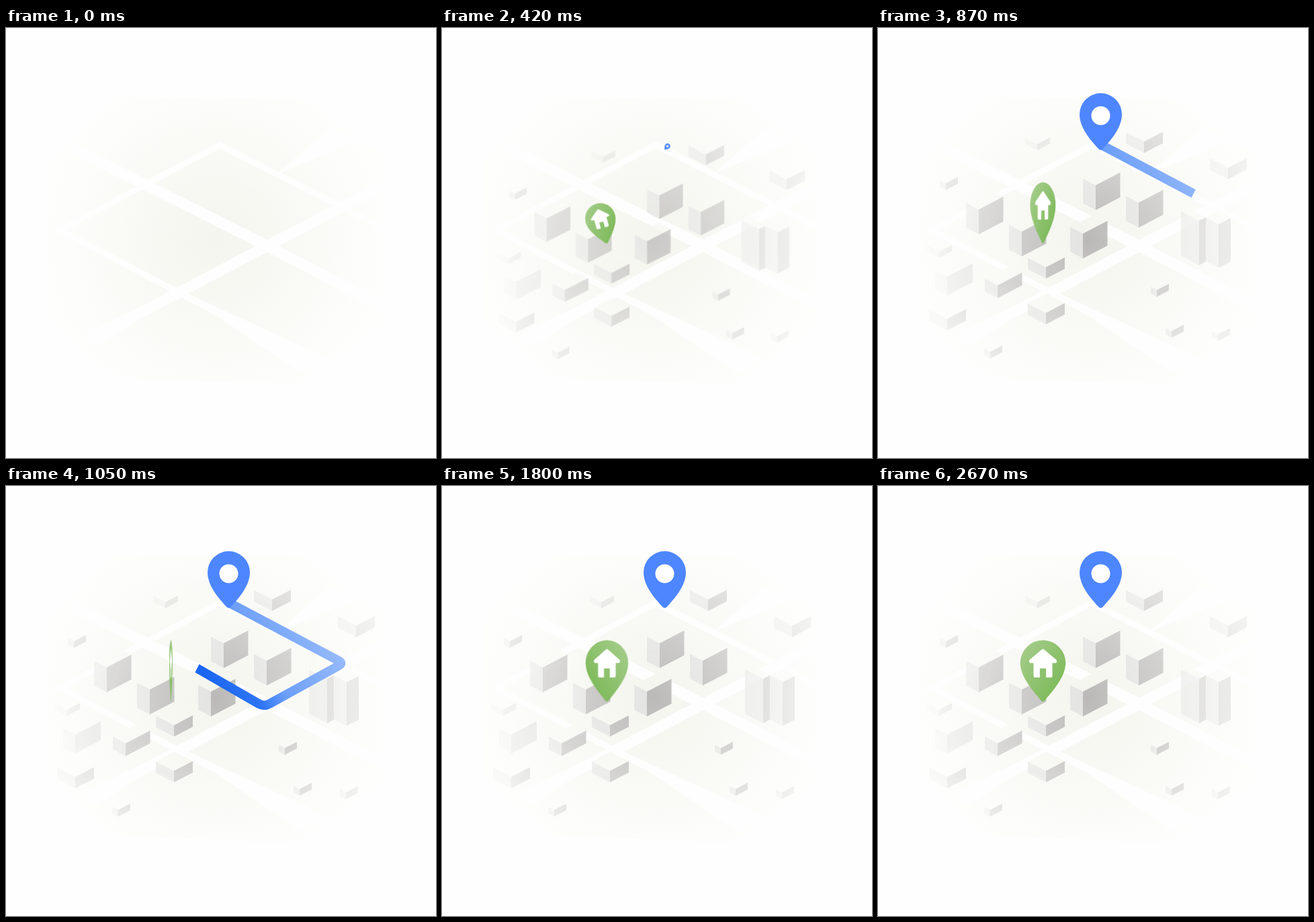
An HTML page for the animation above (2730 ms loop, 640 by 640 pixels).

```html
<!DOCTYPE html>
<html lang="en">
<head>
<meta charset="utf-8">
<title>Route on a map</title>
<style>
  html, body { margin: 0; width: 100%; height: 100%; overflow: hidden; background: #fefefe; }
  svg { position: absolute; inset: 0; width: 100%; height: 100%; }

  .city, .pop, .route, #home { animation: 2730ms linear infinite both; }

  .city { transform-origin: 308px 506px; animation-name: rise; }
  @keyframes rise {
    0%, 6.593% { transform: scale(.857, .78); opacity: 0; animation-timing-function: cubic-bezier(.333, 1, .667, 1); }
    30.769%, 100% { transform: none; opacity: 1; }
  }

  .pop { transform-origin: var(--x) var(--y); }
  .home { --x: 245.5px; --y: 320.5px; --tilt: -45deg; animation-name: pop-home; }
  .goal { --x: 331.5px; --y: 181px; --tilt: 45deg; animation-name: pop-goal; }
  @keyframes pop-home {
    0%, 6.593% { transform: rotate(var(--tilt)) scale(0); animation-timing-function: cubic-bezier(.333, 1, .667, 1); }
    35.165%, 100% { transform: rotate(0deg) scale(1); }
  }
  @keyframes pop-goal {
    0%, 14.725% { transform: rotate(var(--tilt)) scale(0); animation-timing-function: cubic-bezier(.333, 1, .667, 1); }
    30.549%, 100% { transform: rotate(0deg) scale(1); }
  }

  #home { transform-origin: 38.36% 50%; animation-name: spin; }
  @keyframes spin {
    0%, 25.275% { transform: rotateY(0deg); animation-timing-function: cubic-bezier(.25, .55, .6, .78); }
    63.736% { transform: rotateY(180deg); animation-timing-function: cubic-bezier(.25, .44, .6, .76); }
    97.802%, 100% { transform: rotateY(360deg); }
  }

  .route { fill: none; stroke: url(#blue); stroke-width: 13.6; stroke-dasharray: 1 2; animation-name: travel; }
  @keyframes travel {
    0%, 25.275% { stroke-dashoffset: 1; visibility: hidden; animation-timing-function: ease-in-out; }
    41.98% { stroke-dashoffset: 0; visibility: visible; }
    45.6% { stroke-dashoffset: 0; visibility: visible; animation-timing-function: ease-in-out; }
    63.736%, 100% { stroke-dashoffset: -1; visibility: hidden; }
  }
</style>
</head>
<body>
<svg viewBox="0 0 640 640">
  <defs>
    <radialGradient id="ground" gradientUnits="userSpaceOnUse" cx="312" cy="315" r="256">
      <stop offset="0" stop-color="#f5f5ef"/>
      <stop offset=".5" stop-color="#f9f9f5"/>
      <stop offset="1" stop-color="#fefefd"/>
    </radialGradient>
    <radialGradient id="fade" gradientUnits="userSpaceOnUse" cx="312" cy="315" r="330">
      <stop offset="0" stop-color="#fff"/>
      <stop offset=".45" stop-color="#fff" stop-opacity=".52"/>
      <stop offset=".76" stop-color="#fff" stop-opacity=".18"/>
      <stop offset="1" stop-color="#fff" stop-opacity="0"/>
    </radialGradient>
    <mask id="haze" maskUnits="userSpaceOnUse" x="0" y="0" width="640" height="640">
      <rect width="640" height="640" fill="url(#fade)"/>
    </mask>
    <linearGradient id="blue" gradientUnits="userSpaceOnUse" x1="505" y1="255" x2="300" y2="378">
      <stop offset="0" stop-color="#98bbfa"/>
      <stop offset=".44" stop-color="#6d9ff8"/>
      <stop offset=".6" stop-color="#2f76f4"/>
      <stop offset=".8" stop-color="#1b66f1"/>
    </linearGradient>
  </defs>

  <path fill="url(#ground)" d="M160 104H440L560 190V440L430 531L165 521L62 430V200Z"/>
  <g fill="none" stroke="#fefefe">
    <path stroke-width="16" d="M95 177 388 324 560 413M120 466 388 325 560 235"/>
    <path stroke-width="9" d="M560 297 318 174 80 301 460 500"/>
  </g>
  <path fill="#fefefe" d="M250 386 440 514 480 492ZM404 217 480 150 530 166ZM262 388 120 452 135 476Z"/>

  <g class="city" id="roofs" fill="url(#ground)"></g>
  <g mask="url(#haze)"><g class="city" id="walls"></g></g>

  <path class="route" pathLength="1" d="M331.5 173.5 495 260Q502 263.7 495 267.6L392 324.2Q384 328.6 376 324L285 271.7Q279 268.3 273 271.5L246 286"/>

  <g class="pop goal">
    <g transform="translate(331.5 181)">
      <path fill="#4d86ff" d="M0 .5C-2 .5-3-1-4-2-12-11-31.5-31-31.5-52.5A31.5 31.5 0 0 1 31.5-52.5C31.5-31 12-11 4-2 3-1 2 .5 0 .5Z"/>
      <circle cy="-50.5" r="14" fill="#fefefe"/>
    </g>
  </g>
</svg>

<svg id="home" viewBox="0 0 640 640">
  <defs>
    <linearGradient id="green" x1=".1" y1=".1" x2=".8" y2=".75">
      <stop offset="0" stop-color="#a3cc89"/>
      <stop offset="1" stop-color="#80bb5d"/>
    </linearGradient>
  </defs>
  <g class="pop home">
    <g transform="translate(245.5 320.5)">
      <path fill="url(#green)" d="M0 .2C-1.5 .2-2.5-1-3.5-2-12-13-33.75-35-33.75-57.2A33.75 33.75 0 0 1 33.75-57.2C33.75-35 12-13 3.5-2 2.5-1 1.5 .2 0 .2Z"/>
      <g fill="#fff">
        <path stroke="#fff" stroke-width="4" stroke-linejoin="round" d="M0-76 18.5-60.5V-59H-18.5V-60.5Z"/>
        <path d="M-14-60V-38Q-14-35.5-11.5-35.5H-4.6V-49H4.6V-35.5H11.5Q14-35.5 14-38V-60Z"/>
      </g>
    </g>
  </g>
</svg>

<script>
  const SLOPE = .52;

  function face(parent, points, fill, opacity) {
    const el = document.createElementNS("http://www.w3.org/2000/svg", "polygon");
    el.setAttribute("points", points.join(" "));
    if (fill) el.setAttribute("fill", fill);
    if (opacity) el.setAttribute("opacity", opacity);
    parent.append(el);
  }

  // One block; x, y is the top of its front edge
  function block(x, y, { left, right, height, strength = 1 }) {
    const roofs = document.getElementById("roofs");
    const walls = document.getElementById("walls");
    const l = x - left, yl = y - left * SLOPE;
    const r = x + right, yr = y - right * SLOPE;
    face(roofs, [l, yl, x, y, r, yr, r - left, yr - left * SLOPE]);
    face(walls, [l, yl, x, y, x, y + height, l, yl + height], "#e3e3e2", strength);
    face(walls, [x, y, r, yr, r, yr + height, x, y + height], "#bab9b8", strength);
  }

  const house = { left: 19, right: 36.5, height: 37 };
  const shed = { ...house, height: 19 };
  const hall = { left: 27, right: 28, height: 17 };
  const hut = { left: 9, right: 18, height: 10 };
  const pale = { left: 18, right: 19, height: 9, strength: .5 };

  const plan = [
    [house, "324,234 150,270 388,260 214,303 305,306"],
    [hall, "396,169 521,208 250,356 250,424 103,433"],
    [hut, "101,231 415,390 437,451 506,456 167,482"],
    [pale, "237,173 91,333"],
    [shed, "178,383"],
    [{ ...pale, right: 38, height: 28 }, "103,370"],
    [{ left: 27, right: 10, height: 66, strength: .8 }, "478,287"],
    [{ left: 19, right: 18, height: 65, strength: .8 }, "507,292"]
  ];

  for (const [kind, spots] of plan)
    for (const spot of spots.split(" ")) block(...spot.split(",").map(Number), kind);
</script>
</body>
</html>
```
